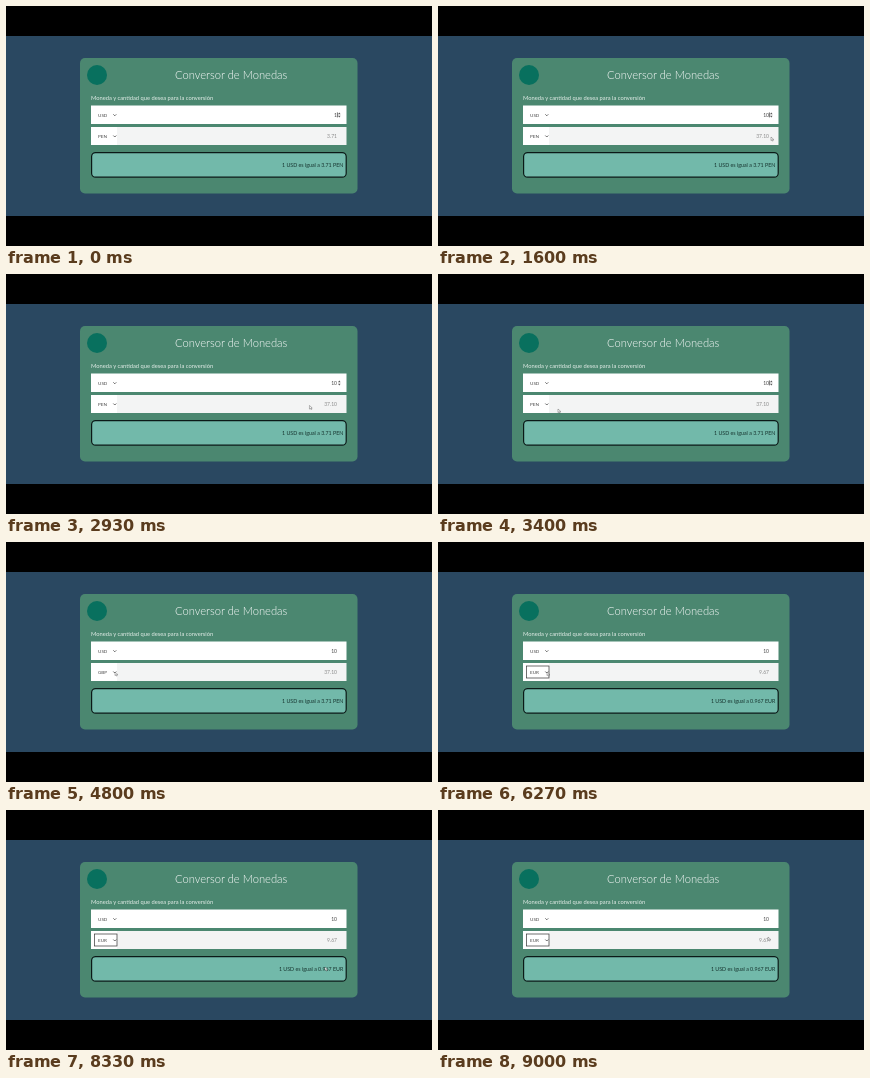
These frames come from a looping animation (426 px wide and 240 px high, 9070 ms). An HTML page:

```html
<!DOCTYPE html>
<html lang="es">
<head>
<meta charset="utf-8">
<title>Conversor de Monedas</title>
<style>
  html, body { margin: 0; width: 100%; height: 100%; overflow: hidden; background: #000; }
  svg { display: block; width: 100vw; height: 100vh; }
  text { font-family: Lato, sans-serif; fill: #444; }
  .title { font-size: 11.2px; font-weight: 300; fill: #fff; }
  .label { font-size: 5.75px; fill: #e4eee9; }
  .code { font-size: 4.6px; }
  .value { font-size: 5px; text-anchor: end; }
  .muted { fill: #888; }
  .result { font-size: 5.3px; text-anchor: end; fill: #16332e; }
  .line { fill: none; stroke: #333; stroke-width: .7; }
</style>
</head>
<body>
<svg viewBox="0 0 426 240">
  <rect y="30" width="426" height="180" fill="#2a4861"/>
  <rect x="74" y="52" width="277.5" height="135.5" rx="5" fill="#4b8770"/>
  <circle cx="91" cy="69" r="10" fill="#08705e"/>
  <text class="title" x="169" y="73">Conversor de Monedas</text>
  <text class="label" x="85" y="94">Moneda y cantidad que desea para la conversión</text>

  <rect x="85" y="99.5" width="255.5" height="18.5" fill="#fff"/>
  <text class="code" x="92" y="110.6">USD</text>
  <path class="line" d="M107.3 108.3l1.5 1.5 1.5-1.5"/>
  <text class="value" id="amount" x="331" y="110.8"></text>
  <path class="line" id="caret" d="M331.4 106.4v5"/>
  <path id="spinner" d="M332 108.2l1.3-1.8 1.3 1.8zM332 109.8l1.3 1.8 1.3-1.8z" fill="#555"/>

  <rect x="85" y="121" width="255.5" height="18" fill="#f3f4f4"/>
  <rect x="85" y="121" width="26" height="18" fill="#fff"/>
  <text class="code" id="currency" x="92" y="131.8"></text>
  <path class="line" d="M107.3 129.5l1.5 1.5 1.5-1.5"/>
  <rect class="line" id="focus" x="88.4" y="124" width="22.6" height="12"/>
  <text class="value muted" id="converted" x="331" y="131.8"></text>

  <rect x="85.6" y="146.6" width="254.6" height="24.6" rx="4" fill="#72b9aa" stroke="#0b1917" stroke-width="1.2"/>
  <text class="result" id="result" x="337.3" y="160.8"></text>

  <path id="cursor" d="M0 0v3.6l.9-.8.6 1.3.7-.3-.6-1.3h1.2z" fill="#fff" stroke="#333" stroke-width=".35"/>
</svg>
<script>
const LOOP = 9070;
const BLINK = 532;
const el = id => document.getElementById(id);
const show = (id, visible) => el(id).style.display = visible ? "" : "none";
const write = (id, text) => {
  if (el(id).textContent !== text) el(id).textContent = text;
};

// Pointer stops: time, x, y
const path = [
  [1470, 333, 115], [1600, 333, 131], [2330, 331, 130], [2400, 331, 130],
  [2600, 329, 131], [2800, 329, 131], [3400, 120, 135], [3670, 109, 130],
  [7330, 109, 130], [7530, 245, 156], [8200, 319, 157], [8330, 319, 157],
  [9000, 330, 127]
];

function pointerAt(t) {
  const next = path.findIndex(stop => stop[0] > t);
  if (next < 0) return path.at(-1).slice(1);
  const [t0, x0, y0] = path[Math.max(0, next - 1)];
  const [t1, x1, y1] = path[next];
  const k = t1 > t0 ? (t - t0) / (t1 - t0) : 0;
  const eased = k * k * (3 - 2 * k);
  return [x0 + (x1 - x0) * eased, y0 + (y1 - y0) * eased];
}

function draw(t) {
  const euro = t >= 6270;
  const editing = t < 3730;
  const rate = euro ? "0.967 EUR" : "3.71 PEN";

  write("amount", t < 70 ? "1" : "10");
  write("converted", t < 130 ? "3.71" : euro ? "9.67" : "37.10");
  write("currency", t < 4800 ? "PEN" : t < 5470 ? "GBP" : "EUR");
  write("result", `1 USD es igual a ${rate}`);

  show("spinner", editing);
  show("caret", editing && (t < 70 || Math.floor((t - 70) / BLINK) % 2 === 0));
  show("focus", euro);
  show("cursor", t >= path[0][0]);
  el("cursor").setAttribute("transform", `translate(${pointerAt(t)})`);
}

const start = performance.now();
function frame() {
  draw((performance.now() - start) % LOOP);
  requestAnimationFrame(frame);
}
frame();
</script>
</body>
</html>
```
